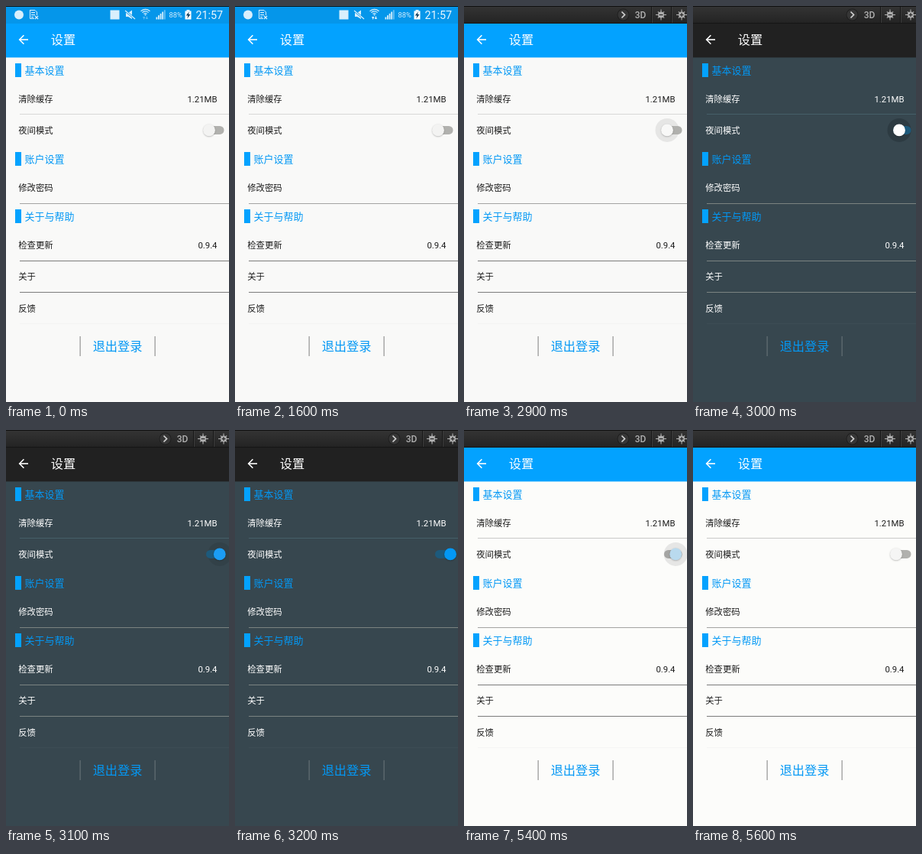
An HTML page with a canvas for the animation above (6300 ms loop, 292 px wide and 518 px high).

```html
<!DOCTYPE html>
<html lang="zh-CN">
<head>
<meta charset="utf-8">
<title>设置</title>
<style>
html, body { margin: 0; width: 100%; height: 100%; overflow: hidden; }
canvas { display: block; width: 292px; height: 518px; }
</style>
</head>
<body>
<canvas id="stage"></canvas>
<script>
const W = 292, H = 518, LOOP = 6300;
const canvas = document.getElementById('stage');
const ctx = canvas.getContext('2d');
const dpr = window.devicePixelRatio || 1;
canvas.width = W * dpr;
canvas.height = H * dpr;

const CJK = '"Noto Sans CJK SC", "Noto Sans CJK", sans-serif';
const LATIN = 'Roboto, sans-serif';
const BLUE = '#03a2ff', LINK = '#0398f5', ICON = '#d9effc';

const LIGHT = { bg: '#f9f9f8', bar: BLUE, text: '#1c1c1c', edge: '#808080', halo: '#e6e6e5',
  off: '#b1b1ae', on: '#a5a5a3', lines: ['#d8d8d7', '#a3a3a2', '#7c7c7c', '#7c7c7c', '#f3f3f2'] };
const BRIGHT = { ...LIGHT, bg: '#fcfcfa', lines: ['#c9c9c8', '#a3a3a2', '#7c7c7c', '#7c7c7c', '#f5f5f4'] };
const DARK = { bg: '#37474f', bar: '#212121', text: '#ffffff', edge: '#6c787c', halo: '#2d3b42',
  off: '#1d5a7c', on: '#1d5a7c', lines: ['#465f69', '#7b8381', '#7b8381', '#7b8381', '#3d4d54'] };

// Switch poses: start time, theme, knob position 0..1, halo strength, knob colour
const POSES = [
  [0, LIGHT, 0, 0, '#f3f3f2'],
  [2900, LIGHT, 0, 1, '#f8f8f7'],
  [3000, DARK, 0.25, 1, '#ffffff'],
  [3100, DARK, 0.86, 0.5, '#1b9df4'],
  [3200, DARK, 1, 0, LINK],
  [5300, BRIGHT, 1, 1, LINK],
  [5400, BRIGHT, 0.7, 1, '#b9daee'],
  [5500, BRIGHT, 0.08, 0.4, '#f3f3f2'],
  [5600, BRIGHT, 0, 0, '#f5f5f4']
];

function rect(x, y, w, h, color) {
  ctx.fillStyle = color;
  ctx.fillRect(x, y, w, h);
}

function disc(x, y, r, color) {
  ctx.fillStyle = color;
  ctx.beginPath();
  ctx.arc(x, y, r, 0, Math.PI * 2);
  ctx.fill();
}

function trace(points) {
  ctx.beginPath();
  for (let i = 0; i < points.length; i += 2) ctx.lineTo(points[i], points[i + 1]);
}

function shape(points, color) {
  ctx.fillStyle = color;
  trace(points);
  ctx.fill();
}

function stroke(points, color, width) {
  ctx.strokeStyle = color;
  ctx.lineWidth = width;
  trace(points);
  ctx.stroke();
}

function label(str, x, y, size, color, family = CJK, weight = 400, align = 'left') {
  ctx.font = `${weight} ${size}px ${family}`;
  ctx.textAlign = align;
  ctx.fillStyle = color;
  ctx.fillText(str, x, y);
}

function wifi(left, right) {
  ctx.strokeStyle = ICON;
  ctx.lineWidth = 1.2;
  for (const r of [3, 5.6, 8.2]) {
    ctx.beginPath();
    ctx.arc(182.5, 12.5, r, -Math.PI * 0.76, -Math.PI * 0.24);
    ctx.stroke();
  }
  disc(182.5, 11.5, 1, ICON);
  const dim = '#58b9f2';
  shape([179, 14, 182.4, 14, 180.7, 18], left ? ICON : dim);
  shape([182.8, 17, 186, 17, 184.4, 12.8], right ? ICON : dim);
}

function phoneBar(t) {
  rect(0, 1, W, 22, '#0596ea');
  disc(17, 11.5, 6, ICON);

  stroke([31.5, 5.5, 38, 5.5, 40.5, 8, 40.5, 12], ICON, 1);
  stroke([31.5, 5, 31.5, 16.5, 37, 16.5], ICON, 1);
  rect(33, 8, 5, 1.2, ICON);
  rect(33, 11, 5, 1.2, ICON);
  rect(33, 14, 3, 1.2, ICON);
  stroke([38, 13, 42, 17], ICON, 1.2);
  stroke([42, 13, 38, 17], ICON, 1.2);

  rect(136.5, 5.5, 12, 12, ICON);

  shape([157, 9, 160, 9, 165, 5.5, 165, 17, 160, 14, 157, 14], ICON);
  stroke([156, 6, 169, 17], '#0596ea', 2.6);
  stroke([156, 6, 169, 17], ICON, 1.2);

  wifi(t >= 1600, t >= 1600 && t < 2500);

  for (let i = 0; i < 5; i++) {
    const h = 3 + i * 2.3;
    rect(196.5 + i * 2.6, 17.5 - h, 1.8, h, i < 4 ? ICON : '#6bc1f3');
  }

  label('88%', 213.5, 15, 9.3, ICON, LATIN);
  rect(236.5, 5, 4, 1.6, '#ffffff');
  rect(234.5, 6.5, 8, 11, '#ffffff');
  shape([239.8, 7.5, 235.7, 12.6, 238.3, 12.6, 237.3, 16.6, 241.5, 11, 239, 11], '#123f5f');
  label('21:57', 284, 17, 14.3, '#eaf6fd', LATIN, 400, 'right');
}

function sun(x, plus) {
  const c = '#b0b0b0';
  for (let i = 0; i < 8; i++) {
    const a = i * Math.PI / 4, cx = Math.cos(a), sy = Math.sin(a);
    const far = i % 2 ? 5.8 : 7;
    stroke([x + cx * 3, 11.5 + sy * 3, x + cx * far, 11.5 + sy * far], c, 1.1);
  }
  disc(x, 11.5, 4, c);
  rect(x - 2.4, 10.9, 4.8, 1.3, '#2b2b2b');
  if (plus) rect(x - 0.65, 9.1, 1.3, 4.8, '#2b2b2b');
}

function toolBar() {
  const g = ctx.createLinearGradient(0, 0, 0, 23);
  g.addColorStop(0, '#343434');
  g.addColorStop(1, '#232323');
  rect(0, 1, W, 22, g);
  rect(0, 22, W, 1, '#151515');
  for (const x of [245, 271]) {
    rect(x, 1, 1, 21, '#171717');
    rect(x + 1, 1, 1, 21, '#3d3d3d');
  }
  disc(208.5, 11.5, 8, '#1f1f1f');
  disc(208.5, 11.5, 7, '#363636');
  stroke([206.5, 7.5, 210.5, 11.5, 206.5, 15.5], '#d2d2d2', 1.7);
  label('3D', 231, 16, 12, '#b0b0b0', LATIN, 500, 'center');
  sun(258, false);
  sun(285, true);
}

function toggle(theme, pos, halo, color) {
  const x = 266 + 16 * pos, y = 162.4;
  if (halo) {
    ctx.globalAlpha = halo;
    disc(x, y, 15.5, theme.halo);
    ctx.globalAlpha = 1;
  }
  ctx.lineCap = 'round';
  stroke([267.5, y, 280, y], pos > 0.5 ? theme.on : theme.off, 11);
  ctx.lineCap = 'butt';
  ctx.save();
  ctx.shadowColor = 'rgba(0,0,0,0.27)';
  ctx.shadowBlur = 2 * dpr;
  ctx.shadowOffsetY = 0.8 * dpr;
  disc(x, y, 7.9, color);
  ctx.restore();
}

function draw(t) {
  const [, theme, pos, halo, color] = POSES.filter(p => p[0] <= t).pop();
  ctx.setTransform(dpr, 0, 0, dpr, 0, 0);
  rect(0, 0, W, H, theme.bg);
  rect(0, 0, W, 1, '#101010');
  rect(0, 23, W, 44.4, theme.bar);
  if (t < 2900) phoneBar(t);
  else toolBar();

  stroke([17.5, 44, 29, 44], '#ffffff', 1.6);
  stroke([23.4, 38.3, 17.7, 44, 23.4, 49.7], '#ffffff', 1.6);
  label('设置', 58.8, 50, 16.2, '#ffffff');

  for (const [str, y] of [['基本设置', 89], ['账户设置', 205], ['关于与帮助', 280]]) {
    rect(12, y - 14, 8, 18, BLUE);
    label(str, 24.5, y, 13, LINK);
  }

  const rows = [['清除缓存', 126], ['夜间模式', 167], ['修改密码', 242],
    ['检查更新', 317], ['关于', 358], ['反馈', 400]];
  for (const [str, y] of rows) label(str, 16.2, y, 11.35, theme.text);
  label('1.21MB', 276.5, 126, 11.35, theme.text, LATIN, 400, 'right');
  label('0.9.4', 276.5, 317, 11.35, theme.text, LATIN, 400, 'right');

  [141, 258, 333, 374, 415].forEach((y, i) => rect(18, y, W - 18, 1, theme.lines[i]));

  for (const x of [96.6, 194.6]) rect(x, 432, 1, 26, theme.edge);
  label('退出登录', W / 2, 451, 16.2, LINK, CJK, 400, 'center');

  toggle(theme, pos, halo, color);
}

const start = performance.now();
function frame() {
  draw((performance.now() - start) % LOOP);
  requestAnimationFrame(frame);
}
frame();
</script>
</body>
</html>
```
